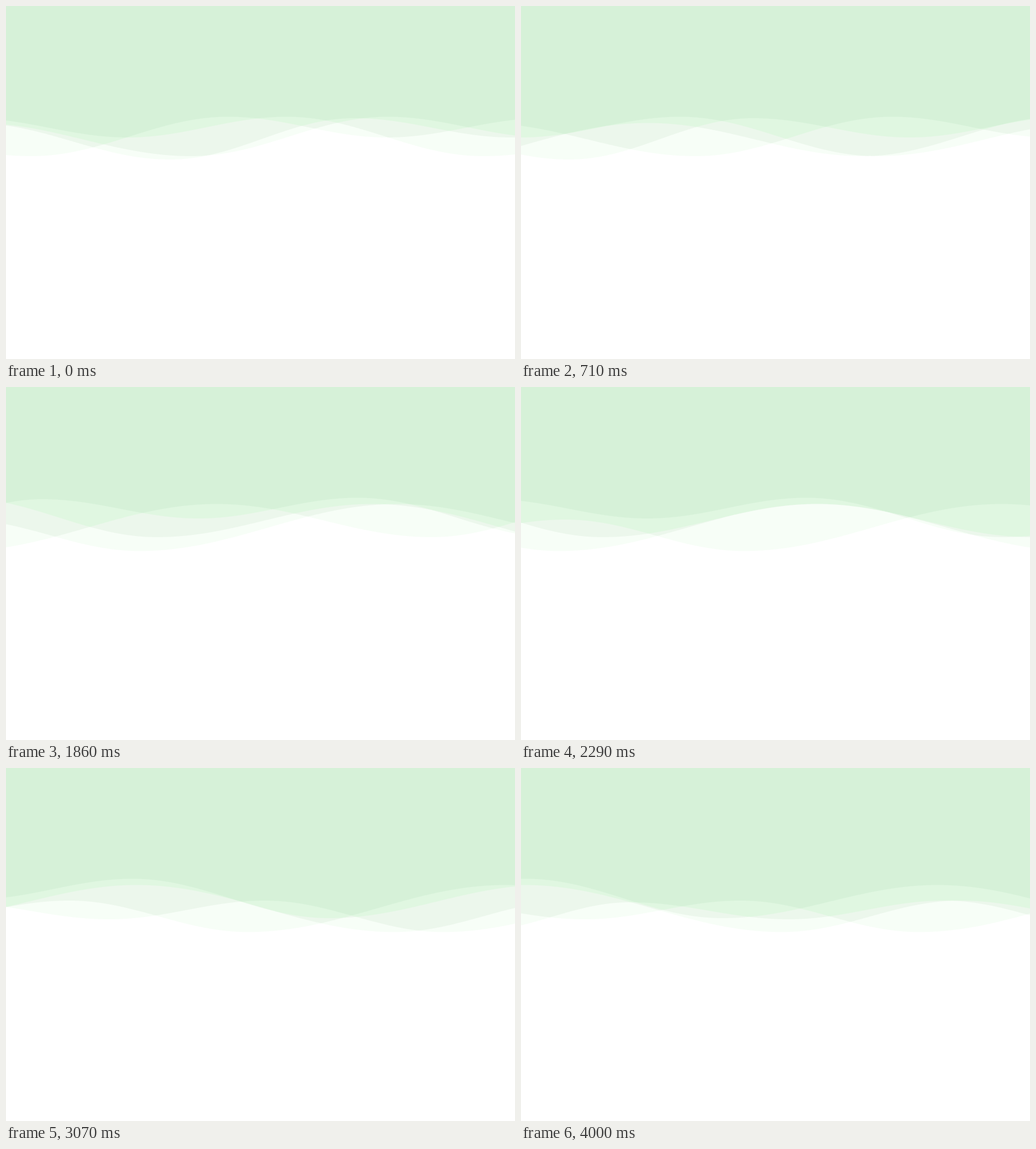
An HTML page with a canvas for the animation above (4080 ms loop, 899 by 623 pixels).

```html
<!DOCTYPE html>
<html>
<head>
<meta charset="utf-8">
<style>
html, body { margin: 0; height: 100%; overflow: hidden; background: #fff; }
canvas { display: block; }
</style>
</head>
<body>
<canvas id="stage" width="899" height="623"></canvas>
<script>
const W = 899, H = 623, LOOP = 4080, TICK = 500 / 7, STEPS = 50;
const ctx = document.getElementById('stage').getContext('2d');

// Crests and troughs of the one profile all waves share: [position, height]
const profile = [
  [-670, 207], [-325, 271], [0, 198], [277, 232], [558, 195.5], [905, 265], [1285, 206.5],
  [1740, 289.5], [2055, 234], [2330, 267], [2610, 237], [2890, 289.5]
];

// Negative travel drifts left; positive travel drifts right with the profile mirrored.
const waves = [
  { start: 615, travel: -1168 },
  { start: -62, travel: -1221 },
  { start: 950, travel: 1497 },
  { start: 1232, travel: 1575 }
];

// Fill colour by how many waves cover a point
const fills = ['#e0f7e1', '#ecf7ec', '#f7fef7', '#ffffff'];

function height(s) {
  const i = Math.max(1, profile.findIndex(([pos]) => pos >= s));
  const [s0, y0] = profile[i - 1], [s1, y1] = profile[i];
  return y0 + (y1 - y0) * (1 - Math.cos(Math.PI * (s - s0) / (s1 - s0))) / 2;
}

// Steady drift with a slight surge, braking over the last five steps
function progress(step) {
  const brake = Math.max(0, step - 45) ** 2 / 10;
  return 0.0208 * (step - brake) + 0.01 * Math.sin(2 * Math.PI * step / 38);
}

// The picture rests for two ticks at the start and for one in every twenty.
function stepAt(time) {
  const tick = Math.floor((time % LOOP + 5) / TICK);
  const step = tick - 2 - Math.floor((tick + 9) / 20);
  return Math.min(STEPS, Math.max(0, step));
}

function draw(time) {
  const p = progress(stepAt(time));
  const columns = Array.from({ length: W + 1 }, (_, x) => waves
    .map(w => height(-Math.sign(w.travel) * (x - w.start - w.travel * p)))
    .sort((a, b) => a - b));

  ctx.fillStyle = '#d6f1d8';
  ctx.fillRect(0, 0, W, H);
  fills.forEach((fill, n) => {
    ctx.beginPath();
    ctx.moveTo(0, H);
    columns.forEach((ys, x) => ctx.lineTo(x, ys[n]));
    ctx.lineTo(W, H);
    ctx.fillStyle = fill;
    ctx.fill();
  });
}

const begin = performance.now();
function loop() {
  draw(performance.now() - begin);
  requestAnimationFrame(loop);
}
loop();
</script>
</body>
</html>
```
